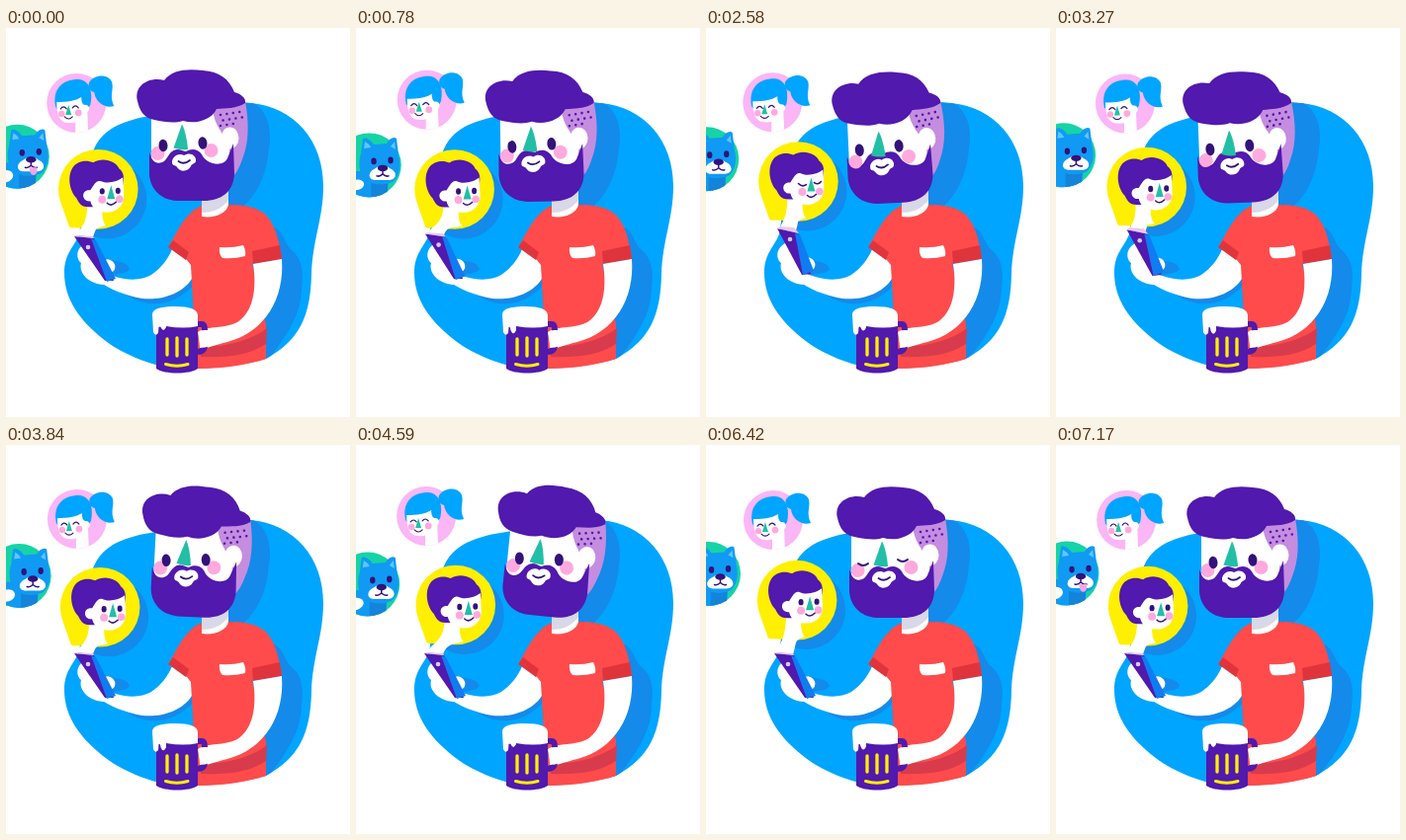
These frames come from a looping animation (348x394 px, 7.2 s). An HTML page with a canvas:

```html
<!DOCTYPE html>
<html lang="en">
<head>
<meta charset="utf-8">
<title>Beer and chat</title>
<style>
html, body { margin: 0; width: 100%; height: 100%; overflow: hidden; background: #fff; }
canvas { display: block; width: 348px; height: 394px; }
</style>
</head>
<body>
<canvas id="stage"></canvas>
<script>
const W = 348, H = 394, LOOP = 7200;
const canvas = document.getElementById('stage');
const c = canvas.getContext('2d');
const dpr = window.devicePixelRatio || 1;
canvas.width = W * dpr;
canvas.height = H * dpr;

const BLUE = '#00a5ff', SHADE = '#148aea', PURPLE = '#5119ad', LILAC = '#c58ddf',
  RED = '#ff4b4b', CUFF = '#e0343c', DARKRED = '#d83b4c', GREEN = '#22bfa6', PINK = '#ffa9de',
  YELLOW = '#ffef00', INK = '#33127a', WHITE = '#fff', DOG = '#109af3';

const BLOB = new Path2D('M247 76C292 80 321 114 321 160C321 193 310 215 309 250C308 290 298 316 263 335C235 343 205 346 172 345C145 342 115 329 97 314C75 296 59 275 59 248C59 228 69 222 74 209C80 180 78 128 98 109C112 95 135 90 160 87C190 80 220 73 247 76Z');

function fill(d, color) {
  c.fillStyle = color;
  c.fill(typeof d === 'string' ? new Path2D(d) : d);
}
function line(d, color, width) {
  c.strokeStyle = color;
  c.lineWidth = width;
  c.lineCap = c.lineJoin = 'round';
  c.stroke(new Path2D(d));
}
function oval(x, y, rx, ry, color, tilt = 0) {
  c.fillStyle = color;
  c.beginPath();
  c.ellipse(x, y, rx, ry, tilt, 0, Math.PI * 2);
  c.fill();
}
const dot = (x, y, r, color) => oval(x, y, r, r, color);
function group(x, y, draw) {
  c.save();
  c.translate(x, y);
  draw();
  c.restore();
}
function clipCircle(r, draw) {
  c.save();
  c.beginPath();
  c.arc(0, 0, r, 0, Math.PI * 2);
  c.clip();
  draw();
  c.restore();
}

// Eased value at time t through [time, value] keys
function track(t, keys) {
  for (let i = 1; i < keys.length; i++) {
    const [t0, a] = keys[i - 1], [t1, b] = keys[i];
    if (t <= t1) {
      const u = (t - t0) / (t1 - t0);
      return a + (b - a) * u * u * (3 - 2 * u);
    }
  }
  return keys[keys.length - 1][1];
}
// Two turns per loop
function orbit(t, x, y, r, startDeg, dir) {
  const a = (startDeg + dir * t * 0.1) * Math.PI / 180;
  return [x + r * Math.cos(a), y + r * Math.sin(a)];
}
function blink(t, times, len = 160) {
  return times.some(s => t >= s && t < s + len);
}

function background(bx, by) {
  fill(BLOB, BLUE);
  c.save();
  c.clip(BLOB);
  dot(bx + 9, by + 10, 40, SHADE);
  fill('M236 70C262 76 270 96 266 122C264 147 254 174 230 188L205 180L215 90Z', SHADE);
  fill('M268 200C282 206 280 216 288 224C300 234 301 246 299 264C298 292 284 312 262 340L240 320Z', SHADE);
  fill('M93 228C104 240 120 232 125 244C122 250 110 248 104 252Z', SHADE);
  fill('M108 258C130 284 165 288 190 260L190 250L130 256Z', SHADE);
  c.restore();
}

function girl(x, y) {
  group(x, y, () => {
    dot(0, 0, 30, '#fbb6f6');
    fill('M13 -21C18 -29 32 -30 36 -21C38 -13 33 -8 38 3C29 6 19 -1 18 -11C14 -12 11 -16 13 -21Z', BLUE);
    fill('M-21 4C-25 -14 -14 -24 2 -24C13 -23 17 -12 14 2L10 8L-18 8Z', BLUE);
    clipCircle(30, () => fill('M-1 8L11 6L12 32L-1 32Z', WHITE));
    fill('M-20 -1C-9 -1 -1 -2 5 -6C5 -1 6 1 8 2C14 1 15 9 8 11C6 18 -1 21 -8 20C-17 20 -20 12 -20 -1Z', WHITE);
    line('M-16 6Q-13 2 -10 6M-4 5Q-1 1 2 5', INK, 1.2);
    fill('M-8 2L-11 12L-5 12Z', GREEN);
    dot(-15, 11, 3.2, PINK);
    dot(2, 10, 3.4, PINK);
    line('M-12 14Q-8 18 -4 14', INK, 1.1);
  });
}

function dog(x, y, look, tongue, asleep) {
  group(x, y, () => {
    dot(0, 0, 32.5, '#16d3a5');
    clipCircle(32.5, () => {
      fill('M-24 40L-18 6L20 6C20 18 18 26 19 40Z', DOG);
      fill('M2 18L19 14L18 40L2 40Z', '#1483da');
      oval(-12, 20, 8 * look, 6 * look, WHITE, -0.3);
    });
    group(2 * look - 1, 0, () => {
      fill('M-9 -12L-7 -27C-3 -29 2 -24 4 -21L17 -22C20 -27 24 -29 27 -27L29 -10C32 0 30 12 23 17C14 21 2 20 -4 15C-11 9 -12 -2 -9 -12Z', DOG);
      fill('M-6 -17L-5 -24Q-1 -22 1 -18Z', '#5fc5ff');
      fill('M21 -19L25 -24L26 -16Z', '#5fc5ff');
      fill('M6 3C9 0 17 0 20 3C28 6 28 15 19 15L6 15C-3 15 -2 6 6 3Z', WHITE);
      oval(13, 3, 5.2, 3.2, INK);
      line('M13 6L13 9M7 11Q10 12 13 9Q16 12 19 11', INK, 1.5);
      if (tongue) fill('M11 11L19 11L19 15C18 20 13 20 12 15Z', '#f7a4e6');
      if (asleep) line('M1 -5Q4 -2 7 -5M18 -5Q21 -2 24 -5', INK, 1.5);
      else {
        oval(4, -4, 2.7, 3.4, INK);
        oval(21, -5, 2.7, 3.4, INK);
      }
    });
  });
}

function friend(x, y, asleep, phoneUp) {
  group(x, y, () => {
    dot(0, 0, 40.3, YELLOW);
    fill('M-37 16L-30 36Q-29 40 -25 39L-4 40L0 0Z', YELLOW);
  });
  const px = 72 + 3 * phoneUp, py = 210 - 7 * phoneUp;
  fill(`M${x - 11} ${y + 12}L${x + 4} ${y + 20}C${x + 4} ${y + 30} ${x + 5} ${y + 34} ${x + 8} ${y + 37}C${x - 4} ${y + 40} ${px + 20} ${py - 8} ${px + 16} ${py + 2}L${px} ${py}C${px + 2} ${py - 8} ${x - 11} ${y + 38} ${x - 11} ${y + 14}Z`, WHITE);
  group(x, y, () => {
    fill('M-10 18C-18 18 -20 13 -22 9C-29 2 -32 -14 -25 -23C-19 -30 -10 -29 -5 -27C4 -33 18 -29 21 -21C27 -17 26 -9 25 -4L10 2L-4 18Z', PURPLE);
    fill('M-8 1C-4 -5 -2 -10 3 -8C10 -5 20 -8 25 -12L26 6C26 20 15 25 4 23C-3 22 -7 17 -8 12C-17 13 -18 0 -8 1Z', WHITE);
    if (asleep) line('M0 2Q4 6 8 3M16 1Q20 4 23 0', INK, 1.5);
    else {
      oval(4, 2, 2.5, 3.2, INK);
      oval(20, 1.5, 2.5, 3.2, INK);
    }
    fill('M13 -4L9 10L17 10Z', GREEN);
    dot(4, 10.5, 4, PINK);
    dot(21.5, 10, 3.8, PINK);
    line('M9 14Q13 18 18 13', INK, 1.5);
  });
}

function quad(a, b, k) {
  const p = a.map((v, i) => v + (b[i] - v) * k);
  return `M${p[0]} ${p[1]}L${p[2]} ${p[3]}L${p[4]} ${p[5]}L${p[6]} ${p[7]}Z`;
}

function phoneArm(up) {
  fill('M96 246C112 255 134 258 147 250C157 243 164 234 168 224L188 236L188 254C178 270 156 276 138 274C120 271 104 264 93 256Z', WHITE);
  oval(104, 241 - 2 * up, 7, 6, WHITE, 0.9);
  fill('M80 218C70 224 71 234 76 238C73 249 85 261 103 260L98 249L92 232C90 223 86 216 80 218Z', WHITE);
  fill(quad([69, 211, 89, 213, 109, 256, 100, 256], [72, 203, 93, 208, 106, 249, 97, 250], up), PURPLE);
  fill(quad([86, 213, 91, 215, 111, 254, 102, 257], [90, 208, 95, 209, 109, 246, 98, 250], up), '#0f7cf2');
  fill(quad([70, 210, 88, 211, 89, 213, 69, 211], [75, 201, 89, 202, 94, 208, 72, 203], up), '#f2c4f2');
  dot(83 + 2 * up, 222 - 8 * up, 2.3, '#d9c9ff');
}

function torso() {
  fill('M198 180C184 185 175 202 165 221L183 235L187 240L190 295L194 345C220 345 246 341 263 335L263 300L249 238L279 233C276 213 271 195 260 187C250 180 238 179 226 179Z', RED);
  fill('M169 215L185 227L182 235L164 222Z', CUFF);
  fill('M249 226L277 220L279 234L250 239Z', CUFF);
  fill('M216 222Q229 223 240 220Q243 226 242 231Q231 234 219 233Q215 229 216 222Z', WHITE);
  fill('M197 322C222 324 248 316 264 304L263 320C245 332 222 334 197 333Z', DARKRED);
  fill('M250 239L279 234C282 274 262 308 224 318C212 321 204 324 197 325L194 308C206 301 220 305 234 298C250 288 254 264 250 239Z', WHITE);
  fill('M198 160L225 160L225 179C223 188 211 193 198 191Z', WHITE);
  fill('M198 166L225 160L225 174C218 184 208 187 198 187Z', '#d8d8e8');
}

function head(angle, down, shut) {
  c.save();
  c.translate(205, 180 + down * 1.5);
  c.rotate(angle);
  c.translate(-205, -180);
  fill('M205 78L242 74C246 96 246 116 239 133C236 142 233 147 229 151L205 145Z', LILAC);
  fill('M147 88L209 82C210 91 213 98 217 104L226 122L226 150L147 150Z', WHITE);
  oval(226.5, 111.5, 9, 11, WHITE);
  fill('M145 126C148 136 152 138 158 136C164 134 164 124 173 123C177 123 180 125 182 125C187 122 194 122 198 128C203 139 220 141 224 132L230 117L231 148C230 166 218 175 200 175L173 175C155 174 144 161 145 144Z', PURPLE);

  group(0.5, 4.5 * down, () => {
    dot(153, 127, 7, PINK);
    dot(207, 124, 7, PINK);
    fill('M177.500 97.500C180 101 183 114 183.500 123Q176 124 169 121.500Z', GREEN);
  });
  group(-down, down, () => {
    if (shut) line('M154 120Q159 124 164 120M194 116Q199 120 204 116', INK, 2);
    else {
      oval(159, 119, 4.5, 6.3, INK, -0.1);
      oval(199, 116.5, 4.5, 6.3, INK, -0.1);
    }
  });
  group(0, 2 * down, () => {
    fill('M168 136C168 130 175 126 180 129C186 125 193 129 192 135C191 138 188 137 187 140C184 146 176 146 173 141C171 138 168 140 168 136Z', WHITE);
    line('M174.500 135Q180 139 186 134', INK, 1.8);
  });

  fill('M133 74C129 58 145 49 160 53C168 42 184 41 199 43C216 44 226 52 231 65C238 67 243 71 242 76C233 82 222 81 213 82C208 93 192 98 179 94C170 97 160 95 150 93C139 91 135 83 133 74Z', PURPLE);
  for (let row = 0; row < 3; row++) {
    for (let i = 0; i < 4 - (row === 2); i++) {
      dot(217 + i * 6.4 + (row % 2) * 2.6, 88 + row * 5.5 - i, 1.3, PURPLE);
    }
  }
  c.restore();
}

function mug(t) {
  line('M193 300L198 300Q201 300 201 306L201 321Q201 328 193 328', PURPLE, 6);
  fill('M195 307C203 305 210 306 211 314C211 321 203 324 196 324Z', WHITE);
  fill('M152 298L194 298L194 345C186 351 160 351 152 345Z', PURPLE);
  line('M163 315L163 331M173 314L173 332M183 315L183 331', YELLOW, 3.3);
  line('M161.500 340.500Q173 344 184 340.500', YELLOW, 3);
  const drip = 2 * Math.sin((t - 2900) / 2400 * Math.PI * 2);
  fill(`M148 290C148 284 158 282 171 282C186 282 194 285 194 291L194 302Q180 305 162 302L162 ${305 + drip}Q159 ${311 + drip} 156.500 ${305 + drip}Q156 302 154.500 303L154 309Q151 313 149 308Z`, WHITE);
  for (const start of [1360, 3980, 6610]) {
    const u = (t - start) / 260;
    if (u > 0 && u < 1) dot(151, 312 + 38 * u * u, 2.8, WHITE);
  }
}

function draw(t) {
  c.setTransform(dpr, 0, 0, dpr, 0, 0);
  c.fillStyle = WHITE;
  c.fillRect(0, 0, W, H);

  const angle = track(t, [[0, 0], [400, 0], [1450, -0.046], [3100, -0.046], [4320, 0.1], [5400, 0.1], [6020, 0], [LOOP, 0]]);
  const down = track(t, [[0, 0], [400, 0], [1450, 1], [3100, 1], [3800, 0], [LOOP, 0]]);
  const look = track(t, [[0, 1], [700, 1], [1050, 0], [3100, 0], [3500, 1], [5000, 1], [5350, 0], [6500, 0], [6850, 1], [LOOP, 1]]);
  const tongue = t > 6800 || t < 700;

  const [fx, fy] = orbit(t, 96.5, 159.5, 5, 130, -1);
  const [gx, gy] = orbit(t, 69.5, 74, 2.6, 48, -1);
  const [dx, dy] = orbit(t, 7, 135.8, 7, -52, 1);

  background(fx, fy);
  girl(gx, gy);
  dog(dx, dy, look, tongue, blink(t, [2050, 5650]));
  friend(fx, fy, blink(t, [2500, 6100]), down);
  phoneArm(down);
  torso();
  head(angle, down, blink(t, [2000, 6400], 140));
  mug(t);
}

const begin = performance.now();
function frame() {
  draw((performance.now() - begin) % LOOP);
  requestAnimationFrame(frame);
}
frame();
</script>
</body>
</html>
```
